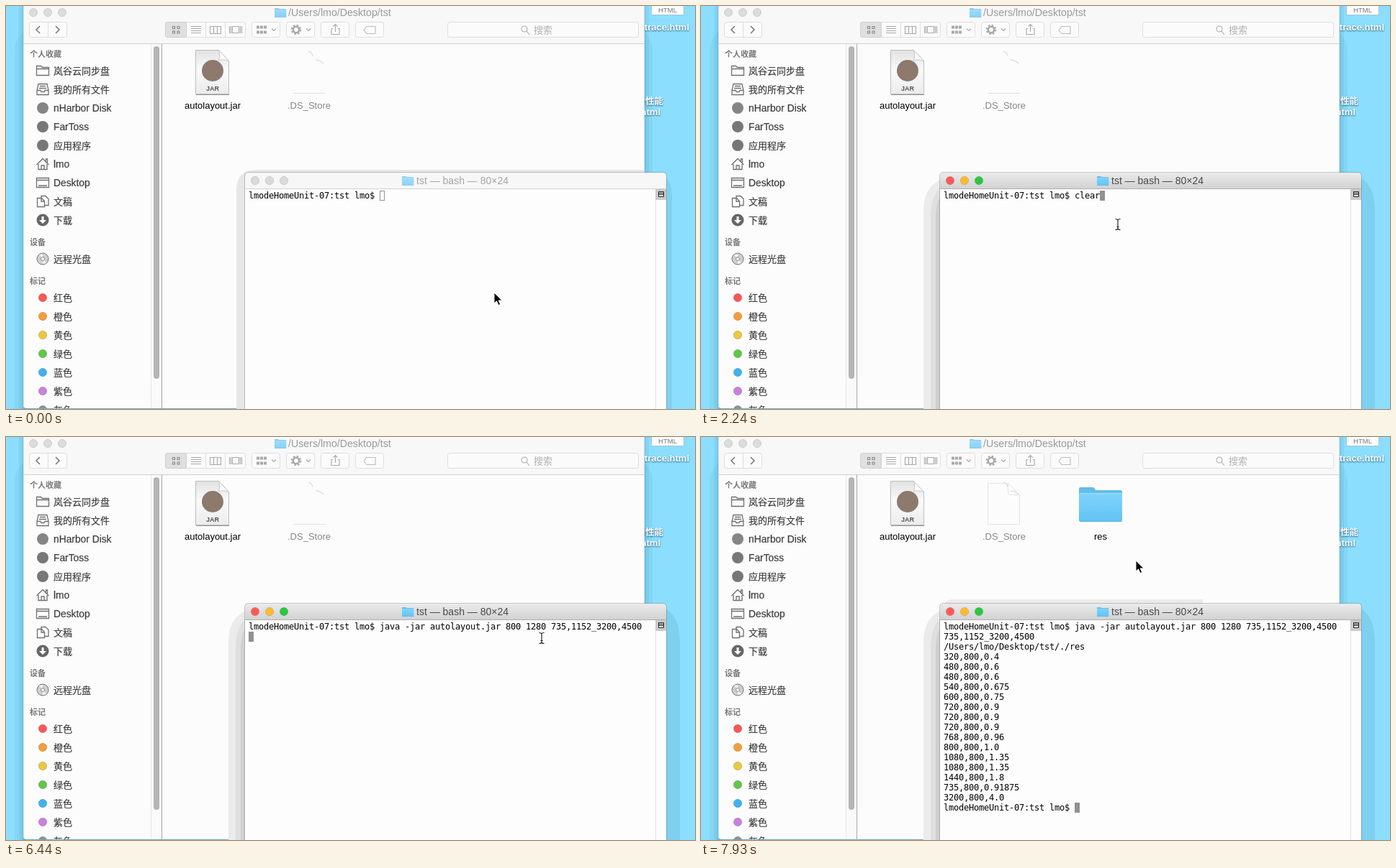
Animation of 957 by 561 pixels, one loop 8000 ms. Source, as an HTML page:

```html
<!DOCTYPE html>
<html lang="zh">
<head>
<meta charset="utf-8">
<title>Terminal run</title>
<style>
html, body { margin: 0; width: 100%; height: 100%; overflow: hidden; background: #8bdefe; }
svg { display: block; width: 957px; height: 561px; }
text { font-family: "Liberation Sans", "Noto Sans CJK SC", sans-serif; font-size: 13px; white-space: pre; }
.mono { font-family: "DejaVu Sans Mono", monospace; font-size: 12px; letter-spacing: calc(7px - 1ch); }
.mid { text-anchor: middle; }
.end { text-anchor: end; }
.title { font-size: 14px; }
.desk { fill: #fff; font-weight: bold; text-shadow: 0 1px 2px #24566e; }
.head { font-size: 11px; font-weight: bold; fill: #777; }
.side { fill: #3c3c3c; stroke: #3c3c3c; stroke-width: .2; }
.latin { font-size: 13.8px; }
.line { fill: none; stroke: #707070; stroke-width: 1.3; }
.btn { fill: #fbfbfb; stroke: #dedede; }
.tool { fill: none; stroke: #a8a8a8; stroke-width: 1.1; }
</style>
</head>
<body>
<svg viewBox="0 0 957 561" xmlns="http://www.w3.org/2000/svg">
  <defs>
    <linearGradient id="bar" x2="0" y2="1"><stop stop-color="#ebebeb"/><stop offset="1" stop-color="#d2d2d2"/></linearGradient>
    <linearGradient id="blue" x2="0" y2="1"><stop stop-color="#7ed3fb"/><stop offset="1" stop-color="#62c3f3"/></linearGradient>
    <linearGradient id="page" x2="0" y2="1"><stop stop-color="#e2e2e2"/><stop offset=".45" stop-color="#fafafa"/><stop offset="1" stop-color="#ececec"/></linearGradient>
    <g id="folder">
      <path d="M0 2q0-2 2-2h17q2 0 3 2l1 2h35q2 0 2 2v40H0z" fill="#62bde9"/>
      <rect y="8" width="60" height="40" rx="2" fill="url(#blue)"/>
      <path d="M1 8.5h58" stroke="#a5e2fd"/>
      <path d="M1 47.5h58" stroke="#55aeda"/>
    </g>
    <path id="caret" d="M-3 -1.5l3 3l3-3" class="tool"/>
  </defs>

  <!-- desktop -->
  <rect width="957" height="561" fill="#8bdefe"/>
  <g fill="#003a5a">
    <rect x="12" y="28" width="886" height="600" rx="34" opacity=".05"/>
    <rect x="18" y="-20" width="875" height="640" rx="22" opacity=".06"/>
    <rect x="22" y="-20" width="867" height="640" rx="10" opacity=".08"/>
  </g>
  <rect x="896.5" y="-6.5" width="45" height="19" fill="#fdfdfd" stroke="#a8c4d0"/>
  <text x="919" y="9" class="mid" style="font-size:9.5px" fill="#777">HTML</text>
  <text x="949" y="34" class="desk end">trace.html</text>
  <text x="913" y="137" class="desk end" style="font-size:12.5px">的性能</text>
  <text x="909" y="152" class="desk end">html</text>

  <!-- file window -->
  <path d="M24 0H887V560H29q-5 0-5-5z" fill="#fcfcfc"/>
  <path d="M28 560.5H332" stroke="#5d9fba"/>
  <rect x="24" width="863" height="52" fill="#f8f8f8"/>
  <path d="M24 52.5H887" stroke="#cfcfcf"/>
  <path d="M24.5 0V556M886.5 0V232" stroke="#c6d5dc" opacity=".7"/>
  <g fill="#dcdcdc" stroke="#cdcdcd"><circle cx="38" cy="9" r="5.5"/><circle cx="58" cy="9" r="5.5"/><circle cx="78" cy="9" r="5.5"/></g>
  <use href="#folder" transform="translate(373 3) scale(.27)" opacity=".75"/>
  <text x="392" y="14" id="path" style="font-size:14.2px" fill="#9a9a9a"></text>
  <g id="tools"></g>
  <rect x="221.5" y="22.5" width="29" height="21" rx="3" fill="#dfdfdf" stroke="#cfcfcf"/>
  <g class="tool">
    <path d="M47 28l-5 5l5 5M69 28l5 5l-5 5" stroke="#777" stroke-width="1.5"/>
    <path d="M231.500 28.500h3v3h-3zM238 28.500h3v3h-3zM231.500 35h3v3h-3zM238 35h3v3h-3z" stroke="#888"/>
    <path d="M257 28.500h14M257 31.500h14M257 34.500h14M257 37.500h14"/>
    <path d="M283.500 28.500h15v10h-15zM288.500 28.500v10M293.500 28.500v10"/>
    <path d="M314.500 28.500h9v9h-9zM310.500 28v10M312.500 28v10M325.500 28v10M327.500 28v10"/>
    <path d="M348 29.500h14M348 36.500h14" stroke-width="4" stroke-dasharray="4 1"/>
    <circle cx="403" cy="33" r="4.200" stroke-width="2.500"/>
    <circle cx="403" cy="33" r="6.300" stroke-width="2" stroke-dasharray="2.500 2.450"/>
    <path d="M454 31.500h-2v8h11v-8h-2M457.500 36v-10M454.500 28.500l3-3l3 3"/>
    <path d="M497 33.500l4-5h12v10h-12z" stroke="#bbb"/>
    <circle cx="720" cy="32" r="4"/><path d="M723 35l4 5"/>
  </g>
  <use href="#caret" x="372" y="33"/><use href="#caret" x="420" y="33"/>
  <text x="733" y="38" fill="#b0b0b0">搜索</text>

  <!-- sidebar -->
  <g id="side"></g>
  <rect x="24" y="560" width="308" height="1" fill="#6ba9c2"/>
  <rect x="202" y="53" width="14" height="507" fill="#fafafa"/>
  <path d="M201.500 53V560" stroke="#e6e6e6"/>
  <path d="M216.500 53V560" stroke="#a9a9a9"/>
  <rect x="205" y="56" width="8" height="463" rx="4" fill="#b5b5b5"/>

  <!-- files -->
  <path d="M263.500 61.500h32l14 15v46h-46z" fill="url(#page)" stroke="#bdbdbd"/>
  <path d="M295.500 61.500q3 8 0 14q7-2 14 1z" fill="#fff" stroke="#c5c5c5"/>
  <path d="M264 123.500h46" stroke="#909090"/>
  <circle cx="287" cy="90" r="15" fill="#8d7a6c"/>
  <text x="287" y="118" class="mid" style="font-size:9px;font-weight:bold" fill="#555">JAR</text>
  <text x="287" y="143" class="mid">autolayout.jar</text>
  <g fill="none" stroke="#e0e0e0">
    <path d="M399 121.500h44"/>
    <path d="M420 63q6 2 6 7M430 75q6 0 11 5" stroke-width="1.500"/>
    <path id="sheet" d="M398.500 64.500h28l16 16v41h-44zM426.500 64.500v13q0 3 3 3h13" stroke="#e4e4e4"/>
  </g>
  <text x="421" y="143" class="mid" fill="#858585">.DS_Store</text>
  <g id="res">
    <use href="#folder" x="525" y="70"/>
    <text x="555" y="143" class="mid">res</text>
  </g>

  <!-- terminal -->
  <g id="softShade">
    <path d="M320 561V256q0-28 28-28H887V561z" fill="#e7e7e7"/>
    <path d="M917 240q8 6 8 26V561h-8z" fill="#00324d" opacity=".08"/>
  </g>
  <g id="deepShade">
    <path id="topShade" d="M338 232q4-6 12-6H697v6z" fill="#ebebeb"/>
    <path d="M309 561V286q0-38 30-46V561z" fill="#ebebeb"/>
    <path d="M319 561V292q0-32 20-44V561z" fill="#dfdfdf"/>
    <path d="M326 561V296q0-28 13-40V561z" fill="#cfcfcf"/>
    <g fill="#00324d" opacity=".08">
      <path d="M917 240q19 10 19 46V561h-19z"/>
      <path d="M917 246q11 14 11 46V561h-11z"/>
      <path d="M917 252q5 14 5 44V561h-5z"/>
    </g>
  </g>
  <path d="M332 561V237q0-5 5-5H912q5 0 5 5V561z" fill="#fdfdfd"/>
  <path id="bar1" d="M332 254V237q0-5 5-5H912q5 0 5 5V254z"/>
  <path d="M331.500 561V237q0-5.500 5.500-5.500H912q5.500 0 5.500 5.500V561" fill="none" stroke="#777" opacity=".4"/>
  <path id="rule" d="M332 254.500H917"/>
  <g id="lights" stroke="#000" stroke-opacity=".12"><circle cx="346" cy="243" r="5.700"/><circle cx="366" cy="243" r="5.700"/><circle cx="386" cy="243" r="5.700"/></g>
  <use href="#folder" id="icon" transform="translate(550 237) scale(.27)"/>
  <text x="570" y="248" class="title" id="caption">tst — bash — 80×24</text>
  <path d="M902.500 270V561" stroke="#e6e6e6"/>
  <rect x="902" y="255" width="15" height="15" fill="#cacaca"/>
  <path d="M906.500 258.500h7v7h-7zM907 260.500h7M907 262.500h7" fill="#eee" stroke="#222"/>
  <rect id="block" width="7" height="14"/>
  <g id="rows"></g>

  <path id="arrow" d="M0 0V15l3.500-3.200l2.500 5.700l2.600-1.100l-2.500-5.500h5z" fill="#000" stroke="#fff" stroke-width="1"/>
  <g id="beam" fill="none">
    <path id="stem" d="M-3.500 -7.500q3 0 3.500 1.500q.5 -1.500 3.500 -1.500M0 -6.500V6.500M-3.500 7.500q3 0 3.500 -1.500q.5 1.500 3.500 1.500M-1.500 3.500h3" stroke="#fff" stroke-width="2.600" opacity=".8"/>
    <use href="#stem"/>
    <path d="M-3.500 -7.500q3 0 3.500 1.500q.5 -1.500 3.500 -1.500M0 -6.500V6.500M-3.500 7.500q3 0 3.500 -1.500q.5 1.500 3.500 1.500M-1.500 3.500h3" stroke="#111" stroke-width="1.100"/>
  </g>
</svg>
<script>
const $ = id => document.getElementById(id);
const LOOP = 8000;
const user = 'lmo';
const prompt = user + 'deHomeUnit-07:tst ' + user + '$ ';
const home = '/Users/' + user + '/Desktop/tst';
const command = prompt + 'java -jar autolayout.jar 800 1280 735,1152_3200,4500';
const output = [
  '735,1152_3200,4500', home + '/./res',
  ...('320,800,0.4 480,800,0.6 480,800,0.6 540,800,0.675 600,800,0.75 720,800,0.9 720,800,0.9 720,800,0.9 ' +
    '768,800,0.96 800,800,1.0 1080,800,1.35 1080,800,1.35 1440,800,1.8 735,800,0.91875 3200,800,4.0').split(' ')
];

// time, x, y, shape
const moves = [
  [0, 678, 399, 'arrow'], [300, 668, 390, 'beam'], [440, 636, 363, 'beam'], [590, 599, 336, 'beam'],
  [740, 589, 320, 'beam'], [890, 582, 308, 'beam'], [1040, 579, 304, 'beam'],
  [4040, 620, 296, 'beam'], [4190, 690, 284, 'beam'], [4340, 738, 276, 'beam'], [4490, 759, 272, 'beam'],
  [4640, 722, 270, 'beam'], [4790, 678, 271, 'beam'], [4940, 593, 272, 'beam'], [5090, 626, 276, 'beam'],
  [5240, 696, 279, 'beam'], [5390, 744, 280, 'beam'], [7190, 722, 345, 'beam'], [7340, 685, 414, 'beam'],
  [7490, 640, 390, 'beam'], [7640, 592, 318, 'beam'], [7790, 584, 238, 'beam'], [7930, 604, 172, 'arrow']
];
const screens = [
  [0, [prompt]], [2240, [prompt + 'clear']], [3290, [command]], [6440, [command, '']],
  [6590, [command, ...output.slice(0, 2), '']], [6740, [command, ...output, prompt]]
];
const FOCUS = 300, FILES = 6890;

function buildTools() {
  const boxes = [[32, 53], [221, 112], [341, 40], [389, 40], [437, 40], [485, 40], [613, 266]];
  $('tools').innerHTML = boxes.map(([x, w]) =>
    `<rect class="btn" x="${x + .5}" y="22.5" width="${w - 1}" height="21" rx="3"/>`).join('') +
    [59, 251, 278, 305].map(x => `<path d="M${x - .5} 23v20" stroke="#dedede"/>`).join('');
}

function buildSide() {
  const path = d => `<path class="line" d="${d}"/>`;
  const dot = (fill, r = 8) => `<circle r="${r}" fill="${fill}"/>`;
  const items = [
    [90, '岚谷云同步盘', path('M-8.500 6.500v-13h6l2 2h9v11zM-8 -2.500h16')],
    [116, '我的所有文件', path('M-6 -7.500h12l2 9v6h-16v-6zM-8 1.500h5l1 2h4l1-2h5M-4 -4.500h8M-5 -1.500h10')],
    [142, 'nHarbor Disk', dot('#858585')],
    [168, 'FarToss', dot('#777')],
    [194, '应用程序', dot('#777')],
    [220, user, path('M-8.500 1L0 -7.500L8.500 1M-6 0v7.500h12v-7.500M4.500 -4v-3h2v5M-2 7v-5h4v5')],
    [246, 'Desktop', path('M-8.500 -6.500h17v13h-17zM-8 -3.500h16M-6 4h12')],
    [272, '文稿', path('M-2 -3.500v-4h6l4 4v9h-6M-7.500 -4.500h6l4 4v8h-10zM-2 -4v4h4')],
    [298, '下载', dot('#666', 8.5) + '<path d="M-1.500 -5h3v5h3.500l-5 5l-5-5h3.500z" fill="#fff"/>'],
    [352, '远程光盘', '<circle r="8" fill="#cfcfcf" stroke="#777"/><path d="M0 0L-5 -6L0 -7zM0 0L5 6L0 7z" fill="#f2f2f2"/><circle r="2.500" fill="#fff" stroke="#888"/>']
  ];
  const tags = [['红', '#fc5753'], ['橙', '#f79d38'], ['黄', '#ecc83f'], ['绿', '#5fc845'],
    ['蓝', '#3eb2f0'], ['紫', '#cb80de'], ['灰', '#919194']];
  tags.forEach(([name, fill], i) => items.push([406 + 26 * i, name + '色',
    `<circle r="5.700" fill="${fill}" stroke="#000" stroke-opacity=".18"/>`]));
  const heads = [[67, '个人收藏'], [329, '设备'], [383, '标记']];
  $('side').innerHTML = heads.map(([y, s]) => `<text class="head" x="33" y="${y + 4}">${s}</text>`).join('') +
    items.map(([y, s, icon]) => `<g transform="translate(51 ${y})">${icon}</g>` +
      `<text class="side ${/^\w/.test(s) ? 'latin' : ''}" x="66" y="${y + 5}">${s}</text>`).join('');
}

const at = (table, t) => table.findLast(row => row[0] <= t);
const show = (id, on) => $(id).setAttribute('visibility', on ? 'visible' : 'hidden');
function set(id, attrs) {
  for (const key in attrs) $(id).setAttribute(key, attrs[key]);
}

let shown;
function drawScreen(lines, active) {
  const last = lines.length - 1;
  const inset = active ? 0 : .5;
  set('block', {
    x: 337 + 7 * lines[last].length + inset, y: 257 + 14 * last + inset,
    width: 7 - 2 * inset, height: 14 - 2 * inset,
    fill: active ? '#919191' : 'none', stroke: active ? 'none' : '#919191'
  });
  if (lines === shown) return;
  shown = lines;
  $('rows').innerHTML = lines.map((s, i) =>
    `<text class="mono" x="337" y="${268 + 14 * i}">${s}</text>`).join('');
}

function draw(t) {
  const active = t >= FOCUS, files = t >= FILES;
  show('softShade', !active);
  show('deepShade', active);
  show('topShade', files);
  show('sheet', files);
  show('res', files);
  set('bar1', { fill: active ? 'url(#bar)' : '#f7f7f7' });
  set('rule', { stroke: active ? '#b0b0b0' : '#d2d2d2' });
  set('caption', { fill: active ? '#4a4a4a' : '#a5a5a5' });
  set('icon', { opacity: active ? 1 : .7 });
  ['#fc5b57', '#fdbc2e', '#28c840'].forEach((fill, i) =>
    $('lights').children[i].setAttribute('fill', active ? fill : '#dadada'));
  drawScreen(at(screens, t)[1], active);
  const [, x, y, shape] = at(moves, t);
  for (const id of ['arrow', 'beam']) show(id, id === shape);
  set(shape, { transform: `translate(${x} ${y})` });
}

function tick() {
  draw(performance.now() % LOOP);
  requestAnimationFrame(tick);
}

$('path').textContent = home;
buildTools();
buildSide();
tick();
</script>
</body>
</html>
```
